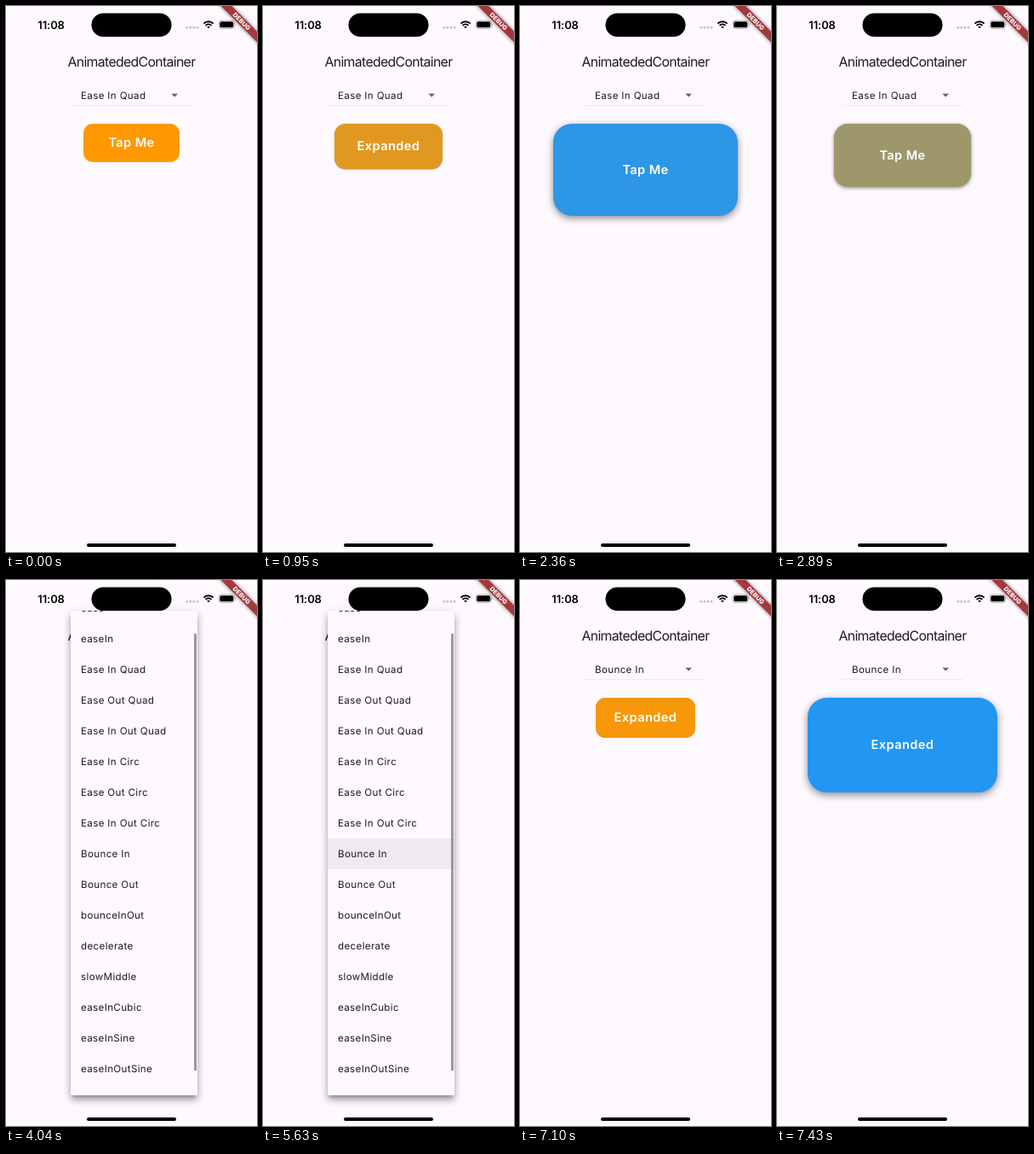
An HTML page that plays this animation: 295x640 px, repeating every 8 s.

```html
<!DOCTYPE html>
<html lang="en">
<head>
<meta charset="utf-8">
<title>Animated container</title>
<style>
html, body { margin: 0; width: 100%; height: 100%; overflow: hidden; }
body {
  position: relative; background: #fef8ff; color: #1d1b20;
  font-family: Inter, "Liberation Sans", sans-serif;
  text-rendering: geometricPrecision;
}
body > * { position: absolute; }
svg { left: 0; top: 0; width: 295px; height: 640px; }
#title {
  left: 0; width: 295px; top: 56px; line-height: 20px; text-align: center;
  font-size: 15.8px; letter-spacing: -.65px; white-space: nowrap;
}
#choice, .item {
  font-size: 11.6px; letter-spacing: .35px; line-height: 36px;
  height: 36px; white-space: nowrap;
}
#choice { left: 88px; top: 87px; }
#box {
  top: 137.5px; display: flex; align-items: center; justify-content: center;
  color: #fff; font-size: 14.6px; font-weight: 600; letter-spacing: .4px;
}
#menu {
  left: 76px; width: 149px; overflow: hidden; background: #fef8ff; border-radius: 1.5px;
  box-shadow: 0 4px 4px -2px #0003, 0 6px 8px #0024, 0 2px 11px #0000001f;
}
#list { position: absolute; left: 0; width: 100%; }
.item { padding-left: 12px; }
#bar {
  position: absolute; left: 145px; top: 27px; width: 2.5px; height: 512px;
  background: #9b979c;
}
</style>
</head>
<body>
<div id="title">AnimatededContainer</div>
<svg viewBox="0 0 295 640">
  <path d="M76 116.5H219" stroke="#eee6ef" stroke-width=".8"/>
  <path d="M194.4 102.8h7.6l-3.8 3.9z" fill="#67646a"/>
</svg>
<div id="choice"></div>
<div id="box"><span id="label"></span></div>
<div id="menu"><div id="list"></div><div id="bar"></div></div>
<svg viewBox="0 0 295 640">
  <text x="37.3" y="26.5" font-size="13" font-weight="600" letter-spacing="-.1" fill="#000">11:08</text>
  <rect x="100.5" y="8.5" width="94" height="27.5" rx="13.75"/>
  <g fill="#c4bfc6">
    <circle cx="212.7" cy="25.2" r="1.4"/><circle cx="216.8" cy="25.2" r="1.4"/>
    <circle cx="220.9" cy="25.2" r="1.4"/><circle cx="225" cy="25.2" r="1.4"/>
  </g>
  <g fill="none" stroke="#000" stroke-width="1.9">
    <path d="M232.4 20.6a8 8 0 0 1 11.2 0M234.6 22.9a4.9 4.9 0 0 1 6.8 0"/>
    <path d="M236.2 24.5L238 26.3l1.8-1.8a2.6 2.6 0 0 0-3.6 0z" fill="#000" stroke="none"/>
  </g>
  <rect x="250" y="17" width="18.6" height="9.6" rx="3" fill="none" stroke="#aaa5ab" stroke-width=".8"/>
  <rect x="251.3" y="18.3" width="16" height="7" rx="1.9"/>
  <path d="M269.6 20.2q1.5 1.6 0 3.2z" fill="#aaa5ab"/>
  <rect x="95" y="630" width="105" height="4" rx="2"/>
  <g transform="translate(295 0) rotate(45)">
    <rect x="-35" y="21" width="70" height="9" style="filter:drop-shadow(0 0 2px #0008)" fill="#a4383b"/>
    <text y="28.2" text-anchor="middle" font-size="7.3" font-weight="800" letter-spacing=".1" fill="#fff">DEBUG</text>
  </g>
</svg>
<script>
const LOOP = 8000;
const names = ["ease", "easeIn", "Ease In Quad", "Ease Out Quad", "Ease In Out Quad",
  "Ease In Circ", "Ease Out Circ", "Ease In Out Circ", "Bounce In", "Bounce Out",
  "bounceInOut", "decelerate", "slowMiddle", "easeInCubic", "easeInSine", "easeInOutSine"];
const [choice, box, label, menu, list, bar] =
  ["choice", "box", "label", "menu", "list", "bar"].map(id => document.getElementById(id));
const items = names.map(name => {
  const el = document.createElement("div");
  el.className = "item";
  el.textContent = name;
  return list.appendChild(el);
});

const clamp = v => Math.min(1, Math.max(0, v));
const mix = (a, b, p) => a + (b - a) * p;
const bezier = (a, b, s) => 3 * (1 - s) ** 2 * s * a + 3 * (1 - s) * s * s * b + s ** 3;

function easeInQuad(x) {
  let lo = 0, hi = 1;
  for (let i = 0; i < 20; i++) {
    const mid = (lo + hi) / 2;
    if (bezier(.55, .68, mid) < x) lo = mid; else hi = mid;
  }
  return bezier(.085, .53, lo);
}

function bounceOut(t) {
  const n = 7.5625, d = 2.75;
  if (t < 1 / d) return n * t * t;
  if (t < 2 / d) return n * (t - 1.5 / d) ** 2 + .75;
  if (t < 2.5 / d) return n * (t - 2.25 / d) ** 2 + .9375;
  return n * (t - 2.625 / d) ** 2 + .984375;
}
const bounceIn = t => 1 - bounceOut(1 - t);

// Each tap runs in visible ticks; lag is the delay before movement, in ticks.
const taps = [
  { start: 500, end: 1600, ticks: 10, lag: .57, from: 0, to: 1, ease: easeInQuad },
  { start: 2140, end: 3110, ticks: 9, lag: 0, from: 1, to: 0, ease: easeInQuad },
  { start: 6450, end: 7430, ticks: 9, lag: 0, from: 0, to: 1, ease: bounceIn }
];

function drawBox(t) {
  const tap = taps.filter(a => t >= a.start).pop();
  let p = 0;
  if (tap) {
    const k = Math.floor((t - tap.start + 8) / (tap.end - tap.start) * tap.ticks);
    const x = k >= tap.ticks ? 1 : clamp((k - tap.lag) * .1036);
    p = mix(tap.from, tap.to, tap.ease(x));
  }
  const w = mix(112.6, 223.4, p);
  box.style.left = 147.5 - w / 2 + "px";
  box.style.width = w + "px";
  box.style.height = mix(45, 111.8, p) + "px";
  box.style.borderRadius = mix(11.3, 22.5, p) + "px";
  box.style.background = `rgb(${mix(255, 33, p)}, ${mix(152, 150, p)}, ${mix(0, 243, p)})`;
  box.style.boxShadow = p ? `0 ${3 * p}px ${9.5 * p}px rgba(0,0,0,.45)` : "none";
  label.textContent = tap && tap.to ? "Expanded" : "Tap Me";
}

function drawMenu(t) {
  const shown = t >= 3700 && t < 5960;
  menu.style.display = shown ? "block" : "none";
  choice.textContent = names[t < 5850 ? 2 : 8];
  if (!shown) return;
  const open = clamp(.3 + .35 * Math.floor((t - 3700) / 113));
  const grow = clamp((open - .25) * 4);
  const top = mix(87, 36, grow);
  menu.style.top = top + "px";
  menu.style.height = mix(123, 604, grow) - top + "px";
  menu.style.opacity = t < 5850 ? 1 : .4;
  list.style.top = 15 - top + "px";
  bar.style.opacity = t < 4040 ? 0 : 1;
  const unit = .5 / (items.length + 1.5);
  items.forEach((el, i) => {
    el.style.opacity = i === 2 ? 1 : clamp((open - .5 - (i + 1) * unit) / (1.5 * unit));
    el.style.background = i === 8 && t >= 5630 ? "#0000000f" : "none";
  });
}

function frame(now) {
  const t = now % LOOP;
  drawBox(t);
  drawMenu(t);
  requestAnimationFrame(frame);
}
frame(0);
</script>
</body>
</html>
```
